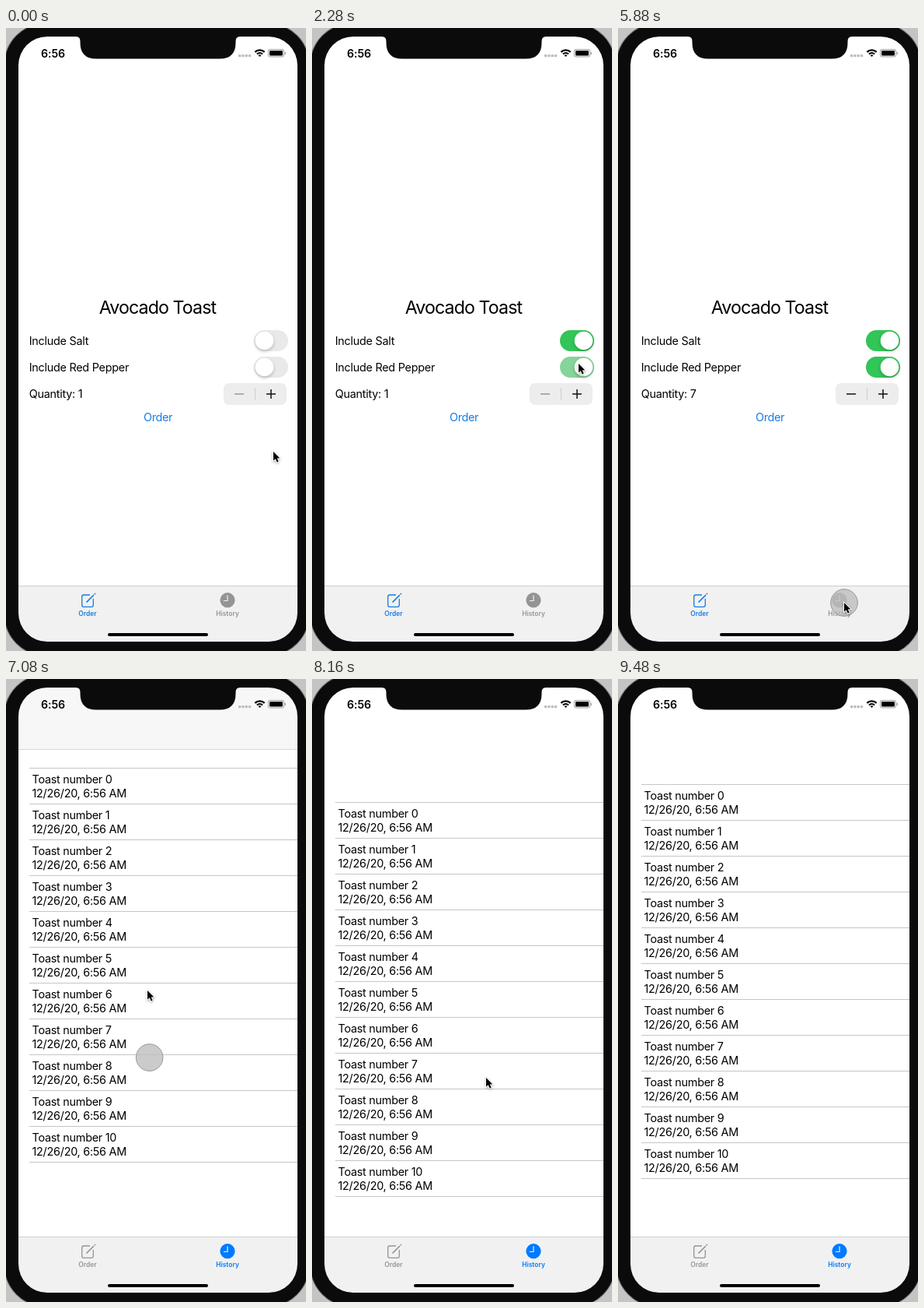
These frames come from a looping animation (386 by 800 pixels, 9.6 s). An HTML page with a canvas:

```html
<!DOCTYPE html>
<html lang="en">
<head>
<meta charset="utf-8">
<title>Toast order</title>
<style>
  html, body { margin: 0; width: 100%; height: 100%; overflow: hidden; background: #c4c4c4; }
  canvas { display: block; }
</style>
</head>
<body>
<canvas id="stage" width="386" height="800"></canvas>
<script>
const ctx = document.getElementById('stage').getContext('2d');
const LOOP = 9600, STEP = 120, TOUCH_LAG = 86;
const BLACK = '#0b0b0b', GREY = '#949494', BLUE = '#147ce5', BAR = '#f1f1f1';

const clamp = (v, max = 1) => Math.max(0, Math.min(max, v));
const smooth = u => u * u * (3 - 2 * u);
const mix = (a, b, u) => a + (b - a) * u;
const within = (t, { from, to }) => t >= from && t < to;
const span = (from, duration) => ({ from, to: from + duration });
const move = (from, duration, x, y) => ({ ...span(from, duration), x, y });

// The pointer rests between its moves
const REST = { x: 344, y: 544 };
const moves = {
  salt: move(0, 840, 343, 405),
  pepper: move(1560, 480, 343, 431),
  plus: move(2300, 400, 342, 477),
  order: move(3900, 420, 195, 500),
  history: move(4700, 700, 291, 738),
  list: move(6300, 540, 186, 530),
  swipeUp: move(6900, 360, 178, 270),
  grab: move(7440, 160, 188, 295),
  swipeDown: move(7640, 320, 224, 512),
  away: move(8400, 360, 255, 50),
  exit: move(8900, 100, 264, 27)
};
const tapAfter = (place, delay, duration = 120) => span(moves[place].to + delay, duration);
const saltTap = tapAfter('salt', 220), pepperTap = tapAfter('pepper', 100);
const orderTap = tapAfter('order', 120, 230), historyTap = tapAfter('history', 400, 190);
const dragUp = span(6900, 470), dragDown = span(7660, 325);
const PLUS_TAPS = 6, PLUS_EVERY = 180;
const plusTaps = Array.from({ length: PLUS_TAPS }, (_, i) => tapAfter('plus', 180 + i * PLUS_EVERY, 90));
const touches = [saltTap, pepperTap, ...plusTaps, orderTap, historyTap, dragUp, dragDown];

function pointerAt(t) {
  return Object.values(moves).reduce((p, m) => {
    const u = smooth(clamp((t - m.from) / (m.to - m.from)));
    return { x: mix(p.x, m.x, u), y: mix(p.y, m.y, u) };
  }, REST);
}

// Rubber-band drag followed by a critically damped return
function pull(t, { from, to }, startY) {
  if (t < from) return 0;
  const d = (pointerAt(Math.min(t, to) - TOUCH_LAG).y - startY) / 2;
  const s = Math.max(0, t - to) * 0.015;
  return d / (1 + Math.abs(d) / 777) * (1 + s) * Math.exp(-s);
}

function box(x, y, w, h, r, fill) {
  ctx.beginPath();
  ctx.roundRect(x, y, w, h, r);
  ctx.fillStyle = fill;
  ctx.fill();
}

function disc(x, y, r, fill) {
  ctx.beginPath();
  ctx.arc(x, y, r, 0, 7);
  ctx.fillStyle = fill;
  ctx.fill();
}

function stroke(path, color, width) {
  ctx.strokeStyle = color;
  ctx.lineWidth = width;
  ctx.stroke(new Path2D(path));
}

function text(str, x, y, { size = 14.4, weight = 400, color = '#000', align = 'left', spacing = -0.26 } = {}) {
  ctx.font = `${weight} ${size}px Inter, sans-serif`;
  ctx.letterSpacing = spacing + 'px';
  ctx.textAlign = align;
  ctx.fillStyle = color;
  ctx.fillText(str, x, y);
}

function toggle(y, elapsed) {
  const slide = smooth(clamp(elapsed / 120));
  box(319, y, 44, 27, 13.5, '#e9e9e9');
  ctx.globalAlpha = clamp(elapsed / 240);
  box(319, y, 44, 27, 13.5, '#32c558');
  ctx.globalAlpha = 1;
  ctx.save();
  ctx.shadowColor = 'rgba(0,0,0,.22)';
  ctx.shadowBlur = 4;
  ctx.shadowOffsetY = 2;
  disc(mix(332.5, 349.5, slide), y + 13.5, 11.8, '#fff');
  ctx.restore();
}

function orderScreen(t) {
  const quantity = 1 + plusTaps.filter(tap => t >= tap.from + 50).length;
  text('Avocado Toast', 195, 367, { size: 23.2, align: 'center', spacing: -0.9 });
  ['Include Salt', 'Include Red Pepper', 'Quantity: ' + quantity]
    .forEach((label, i) => text(label, 29.7, 407 + i * 34));
  [saltTap, pepperTap].forEach((tap, i) => toggle(388 + i * 34, t - tap.from - 10));
  box(280, 456, 81, 28, 7, '#ededed');
  stroke('M320.5 462v16', '#cfcfcf', 1);
  stroke('M294 470h12', quantity > 1 ? '#111' : '#999', 1.5);
  stroke('M335 470h12M341 464v12', '#111', 1.5);
  ctx.globalAlpha = within(t, orderTap) ? 0.3 : 1;
  text('Order', 195.5, 504.5, { color: BLUE, align: 'center', spacing: -0.4 });
  ctx.globalAlpha = 1;
}

function historyScreen(t) {
  const offset = pull(t, dragUp, moves.list.y) + pull(t, dragDown, moves.grab.y);
  const rows = 11, rowHeight = 46;
  for (let i = 0; i <= rows; i++) {
    const y = Math.round(135 + offset) + i * rowHeight;
    box(30, y, 345, 1, 0, '#c6c6c8');
    if (i === rows) break;
    text('Toast number ' + i, 33.5, y + 20);
    text('12/26/20, 6:56 AM', 33.5, y + 38);
  }
  ctx.globalAlpha = clamp(-offset / 10);
  box(16, 11, 359, 80, 0, '#f7f7f7');
  box(16, 90, 359, 1, 0, '#d9d9d9');
  ctx.globalAlpha = 1;
}

function tabBar(onHistory) {
  const orderColor = onHistory ? GREY : BLUE, historyColor = onHistory ? '#007aff' : GREY;
  const label = { size: 8.4, weight: 600, align: 'center', spacing: 0.05 };
  box(16, 716, 359, 73, 0, BAR);
  box(16, 716, 359, 1, 0, '#cfcfcf');

  stroke('M108 728h-8q-2.3 0-2.3 2.3v10.7q0 2.3 2.3 2.3h10q2.3 0 2.3-2.3v-8', orderColor, 1.3);
  stroke('M103.5 737.5l9.5-9.5m.8-.8l1.2-1.2', orderColor, 1.7);
  text('Order', 105, 755, { ...label, color: orderColor });

  disc(285, 734.7, 9.6, historyColor);
  stroke('M285 728.5v7h-5.2', BAR, 1.2);
  text('History', 285, 755, { ...label, color: historyColor });
  box(131, 777, 129, 4, 2, '#000');
}

function statusBar() {
  text('6:56', 45, 37.5, { size: 14.2, weight: 600, spacing: -0.1 });
  for (let i = 0; i < 4; i++) box(299 + i * 4.3, 34, 3.3, 3.3, 0.8, '#bdbdbd');
  for (const r of [1.6, 5, 8.7]) {
    ctx.beginPath();
    ctx.arc(326.5, 37, r, -Math.PI * 0.75, -Math.PI * 0.25);
    ctx.strokeStyle = '#000';
    ctx.lineWidth = 2.2;
    ctx.stroke();
  }
  ['#a0a0a0', '#fff', '#000'].forEach((fill, i) =>
    box(337 + i, 27 + i, 21 - 2 * i, 10.6 - 2 * i, 3 - 0.8 * i, fill));
  box(358.7, 30.5, 1.3, 3.6, 0.7, '#a0a0a0');
}

// Phone body around the display, with the notch
function bezel() {
  ctx.beginPath();
  ctx.roundRect(-2, -6, 392, 812, 54);
  ctx.strokeStyle = '#777';
  ctx.lineWidth = 2;
  ctx.stroke();
  ctx.roundRect(16, 11, 359, 777, 37);
  ctx.fillStyle = BLACK;
  ctx.fill('evenodd');
  ctx.fill(new Path2D('M90 10v1q5.5 0 5.5 6v2q0 20.5 20.5 20.5h159q20.5 0 20.5-20.5v-2q0-6 5.5-6v-1z'));
}

function touchDot({ x, y }) {
  disc(x, y, 17.3, 'rgba(190,190,190,.8)');
  ctx.strokeStyle = '#979797';
  ctx.lineWidth = 1;
  ctx.stroke();
}

function arrow({ x, y }) {
  const shape = new Path2D('M0 0v11.5l2.7-2.3 2 4.4 2-.9-1.9-4.3 3.4-.2z');
  ctx.save();
  ctx.translate(x, y);
  ctx.shadowColor = 'rgba(0,0,0,.35)';
  ctx.shadowBlur = 3;
  ctx.shadowOffsetY = 1;
  ctx.strokeStyle = '#fff';
  ctx.lineWidth = 1.8;
  ctx.stroke(shape);
  ctx.shadowColor = 'transparent';
  ctx.fillStyle = '#000';
  ctx.fill(shape);
  ctx.restore();
}

function draw(t) {
  const onHistory = t >= historyTap.to;
  box(0, 0, 386, 800, 0, '#c4c4c4');
  box(16, 11, 359, 777, 37, '#fff');
  (onHistory ? historyScreen : orderScreen)(t);
  tabBar(onHistory);
  statusBar();
  bezel();
  if (touches.some(touch => within(t, touch))) touchDot(pointerAt(t - TOUCH_LAG));
  if (t < moves.exit.to + 100) arrow(pointerAt(t));
}

const start = performance.now();
function tick() {
  const t = (performance.now() - start) % LOOP;
  draw(Math.floor(t / STEP) * STEP);
  requestAnimationFrame(tick);
}
tick();
</script>
</body>
</html>
```
